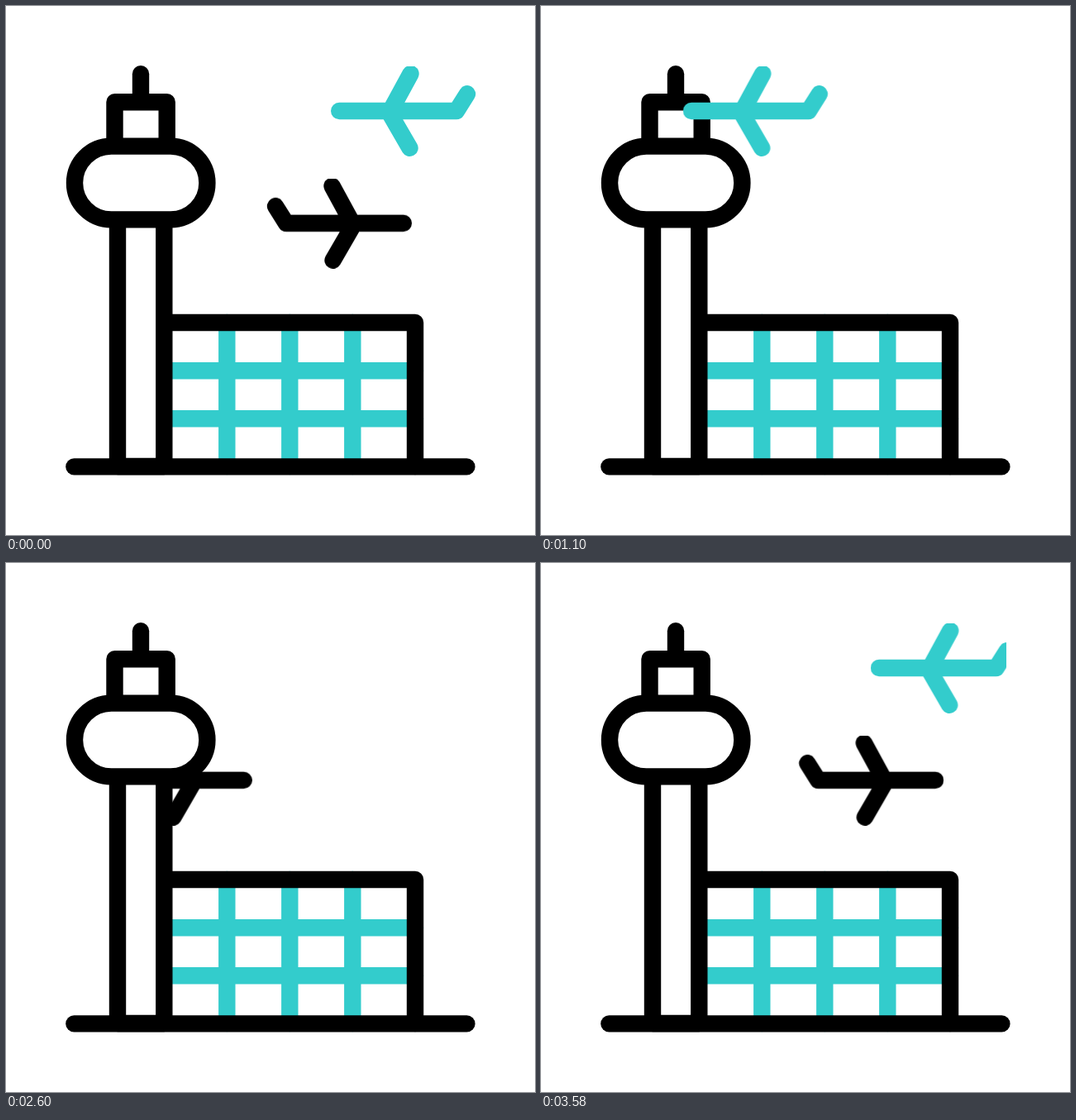
An HTML page for the animation above (3.6 s loop, 640 by 640 pixels).

```html
<!DOCTYPE html>
<html lang="en">
<head>
<meta charset="utf-8">
<title>Airport</title>
<style>
  html, body { margin: 0; width: 100%; height: 100%; overflow: hidden; background: #fff; }
  svg { display: block; width: 100%; height: 100%; }
  .line { fill: none; stroke-width: 20.4; stroke-linecap: round; stroke-linejoin: round; }
  .teal { stroke: #33cccc; }
  .black { stroke: #000; }
  .solid { fill: #fff; }
</style>
</head>
<body>
<svg viewBox="0 0 640 640">
  <defs>
    <path id="plane" d="M403.2 127H545L558 106.3M489.5 82L465 127M462.5 127L488.5 171.8"/>
    <clipPath id="tealOutClip"><rect x="75" y="73" width="565" height="108.8"/></clipPath>
    <clipPath id="tealInClip"><rect x="0" y="73" width="563" height="108.8"/></clipPath>
    <clipPath id="blackOutClip"><rect x="0" y="209" width="563" height="108.6"/></clipPath>
    <clipPath id="blackInClip"><rect x="77" y="209" width="563" height="108.6"/></clipPath>
  </defs>

  <g class="line black">
    <g clip-path="url(#blackOutClip)"><g id="blackOut"><use href="#plane" transform="matrix(-1 0 0 1 884 135.8)"/></g></g>
    <g clip-path="url(#blackInClip)"><g id="blackIn"><use href="#plane" transform="matrix(-1 0 0 1 884 135.8)"/></g></g>
  </g>

  <!-- terminal -->
  <path class="line teal" d="M267.3 383V557M343.3 383V557M419.3 383V557M191 441.2H495M191 499.2H495"/>
  <path class="line black" d="M191.3 383H495V557"/>

  <!-- tower -->
  <path class="line black solid" d="M135 258V557H191.3V258"/>
  <path class="line black" d="M163 82.2V116"/>
  <path class="line black solid" d="M131.5 169V116.3H194.7V169"/>
  <rect class="line black solid" x="83" y="169.6" width="160.4" height="88.8" rx="44.4"/>
  <path class="line black" d="M82.4 557.4H557.4"/>

  <g class="line teal">
    <g clip-path="url(#tealOutClip)"><g id="tealOut"><use href="#plane"/></g></g>
    <g clip-path="url(#tealInClip)"><g id="tealIn"><use href="#plane"/></g></g>
  </g>
</svg>
<script>
  const LOOP = 3600;

  // Horizontal offset at the start and end of the loop; the clips hide the rest.
  const flights = [
    ["tealOut", 0, -723.6],
    ["tealIn", 1069, 0],
    ["blackOut", 0, 864],
    ["blackIn", -696.2, 0]
  ];

  const shift = x => ({ transform: `translateX(${x}px)` });

  for (const [id, from, to] of flights) {
    document.getElementById(id).animate([shift(from), shift(to)], {
      duration: LOOP,
      iterations: Infinity,
      easing: "linear"
    }).startTime = 0;
  }
</script>
</body>
</html>
```
